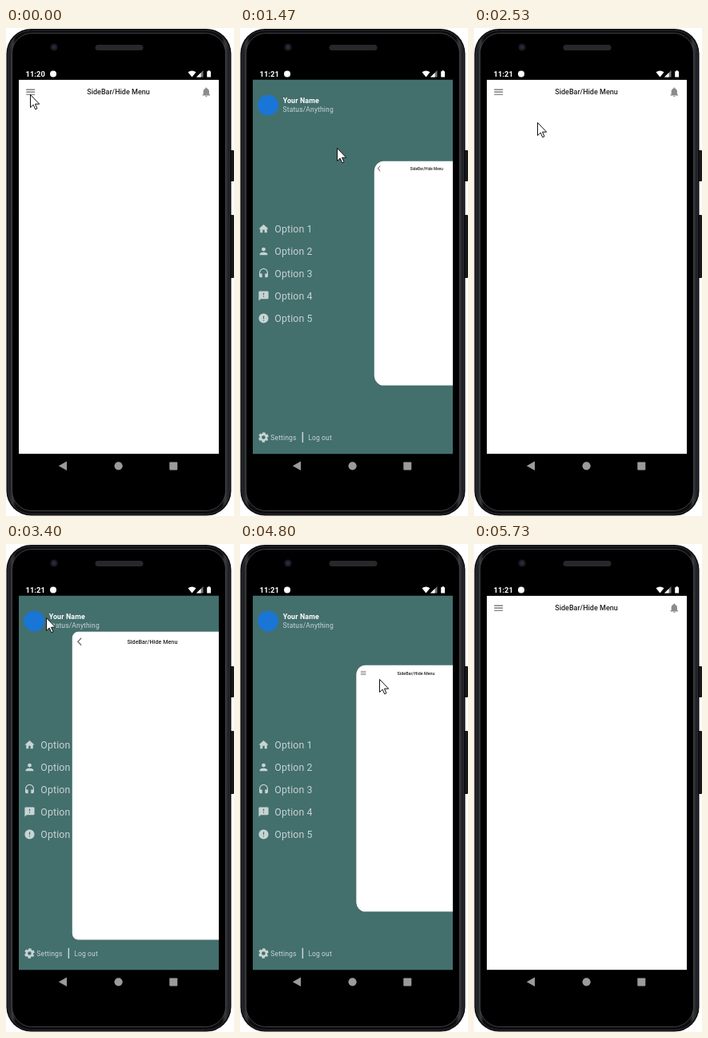
An HTML page for the animation above (6140 ms loop, 285x611 px).

```html
<!DOCTYPE html>
<html lang="en">
<head>
<meta charset="utf-8">
<title>Sidebar menu</title>
<style>
  html, body { margin: 0; width: 100%; height: 100%; overflow: hidden; background: #fff; }
  svg { display: block; width: 100vw; height: 100vh; }
  text { font-family: Roboto, "Open Sans", sans-serif; }
  .drawer { fill: #c7d4d3; }
  .drawer text { font-size: 8.5px; letter-spacing: .15px; }
  .drawer .option { font-size: 12.3px; }
  .drawer .name { font-size: 8.8px; font-weight: 700; fill: #fff; }
  .title { font-size: 9px; font-weight: 500; fill: #222; text-anchor: middle; }
</style>
</head>
<body>
<svg viewBox="0 0 285 611">
  <defs>
    <clipPath id="screen"><rect x="16" y="64.8" width="250" height="468.4"/></clipPath>
    <linearGradient id="rim">
      <stop offset="0" stop-color="#17181a"/>
      <stop offset=".012" stop-color="#26272b"/>
      <stop offset=".02" stop-color="#3a3b40"/>
      <stop offset=".035" stop-color="#0c0c0e"/>
      <stop offset=".965" stop-color="#0c0c0e"/>
      <stop offset=".98" stop-color="#3a3b40"/>
      <stop offset="1" stop-color="#17181a"/>
    </linearGradient>
  </defs>

  <g id="phone">
    <path d="M280 153h4q1 0 1 1v37q0 1-1 1h-4zM280 234h4q1 0 1 1v77q0 1-1 1h-4z" fill="#17181a"/>
    <rect x=".5" y="1" width="281" height="609.5" rx="31" fill="#0b0b0d"/>
    <rect x="2.5" y="3" width="277" height="605.5" rx="29" fill="url(#rim)" stroke="#2c2d31"/>
    <rect x="7.5" y="6.5" width="267" height="598" rx="25" fill="#000" stroke="#45464b" stroke-width=".9"/>
    <circle cx="60" cy="24" r="4.6" fill="#1a1b20"/>
    <circle cx="60" cy="24" r="2.3" fill="#282a44"/>
    <rect x="111.5" y="21" width="60" height="7" rx="3.5" fill="#27282b"/>
    <g fill="#9b9b9b">
      <path d="M65.8 548.3l10.2-5.8v11.6z"/>
      <circle cx="140.6" cy="548.3" r="5.1"/>
      <rect x="204.3" y="543.4" width="10" height="10" rx=".8"/>
    </g>
  </g>

  <g id="status" fill="#fff">
    <text id="clock" x="24.6" y="61" font-size="9.4" font-weight="700"></text>
    <circle cx="59" cy="57.4" r="4"/>
    <path d="M227.5 55.3q5-3.6 10 0l-5 6.2z"/>
    <path d="M246.5 53v8.5H238z" fill="#777"/>
    <path d="M243.6 55.9v5.6H238z"/>
    <path d="M251.2 54.2h1.3v-1h2.3v1h1.3v7.3h-4.9z"/>
  </g>

  <g clip-path="url(#screen)">
    <rect x="16" y="64" width="251" height="470" fill="#436f6d"/>
    <g class="drawer">
      <circle cx="35.1" cy="96.6" r="12.9" fill="#1976d6"/>
      <text class="name" x="53.7" y="94.3">Your Name</text>
      <text x="53.5" y="104.7">Status/Anything</text>
      <g id="options"></g>
      <g transform="translate(29.4 512.5)" fill="none" stroke="#c7d4d3">
        <circle r="3.6" stroke-width="2.6"/>
        <circle r="5.2" stroke-width="2.2" stroke-dasharray="3.2 2.245" stroke-dashoffset="1.6"
          transform="rotate(30)"/>
      </g>
      <text x="38.3" y="515.9">Settings</text>
      <rect x="77.6" y="505.8" width="1.5" height="13.2"/>
      <text x="85.2" y="515.9">Log out</text>
    </g>

    <g id="panel">
      <rect id="sheet" width="251" height="468.2" fill="#fff"/>
      <text class="title" x="124.5" y="18.3">SideBar/Hide Menu</text>
      <path id="menu" fill="#666"/>
      <path id="back" fill="#666"/>
      <path id="bell" fill="#8c8c8c"/>
    </g>
  </g>

  <path id="cursor" d="M.5 .5V16.6L4.2 13.1 6.7 18.8 9 17.8 6.5 12.2H11.7Z"
    fill="#fff" stroke="#111" stroke-width="1"/>
</svg>

<script>
const LOOP = 6140, STEP = 200 / 3, SLIDE = 250;
const OFFSET = { x: 151.8, y: 101.7 };
const toggles = [601, 2070, 3290, 4763];

// [time, x, y] of the pointer tip
const pointer = [
  [1070, 30, 83], [1400, 104, 138], [1670, 174, 186], [1733, 172, 177], [1930, 169, 170],
  [2133, 169, 170], [2330, 129, 149], [2533, 79.5, 118], [2733, 44, 92], [3133, 29, 80.5],
  [3335, 29, 80.5], [3600, 115, 129], [3933, 174, 174], [4000, 181, 176],
  [4133, 181, 176], [4267, 174, 169], [4800, 174, 169],
  [5130, 179, 390], [5400, 170, 602], [5667, 73, 604]
];
const POINTER_GONE = 5730;

const icons = {
  menu: "M3 18h18v-2H3zM3 13h18v-2H3zM3 6v2h18V6z",
  back: "M11.67 3.87L9.9 2.1 0 12l9.9 9.9 1.77-1.77L3.54 12z",
  bell: "M12 22c1.1 0 2-.9 2-2h-4c0 1.1.9 2 2 2zm6-6v-5c0-3.07-1.64-5.64-4.5-6.32V4c0-.83-.67-1.5-1.5-1.5s-1.5.67-1.5 1.5v.68C7.63 5.36 6 7.92 6 11v5l-2 2v1h16v-1z",
  home: "M10 20v-6h4v6h5v-8h3L12 3 2 12h3v8z",
  person: "M12 12a4 4 0 1 0 0-8 4 4 0 0 0 0 8zm0 2c-2.67 0-8 1.34-8 4v2h16v-2c0-2.66-5.33-4-8-4z",
  headset: "M12 1a9 9 0 0 0-9 9v7a3 3 0 0 0 3 3h3v-8H5v-2a7 7 0 0 1 14 0v2h-4v8h3a3 3 0 0 0 3-3v-7a9 9 0 0 0-9-9z",
  feedback: "M20 2H4a2 2 0 0 0-2 2v18l4-4h14a2 2 0 0 0 2-2V4a2 2 0 0 0-2-2zm-7 12h-2v-2h2zm0-4h-2V6h2z",
  error: "M12 2a10 10 0 1 0 0 20 10 10 0 0 0 0-20zm1 15h-2v-2h2zm0-4h-2V7h2z"
};

const $ = id => document.getElementById(id);
const clamp = v => Math.max(0, Math.min(1, v));
const lerp = (a, b, p) => a + (b - a) * p;
const iconAt = (x, y) => `translate(${x} ${y}) scale(.608) translate(-12 -12)`;

for (const [id, x] of [["menu", 14.7], ["back", 14.9], ["bell", 234.3]]) {
  $(id).setAttribute("d", icons[id]);
  $(id).setAttribute("transform", iconAt(x, 15.2));
}

$("options").innerHTML = ["home", "person", "headset", "feedback", "error"].map((name, i) => {
  const y = 251.5 + 28 * i;
  return `<path d="${icons[name]}" transform="${iconAt(29.5, y)}"/>
    <text class="option" x="43.3" y="${y + 4.5}">Option ${i + 1}</text>`;
}).join("");

function pointerAt(t) {
  const next = pointer.findIndex(key => key[0] > t);
  if (next === 0) return pointer[0].slice(1);
  if (next < 0) return pointer.at(-1).slice(1);
  const [t0, x0, y0] = pointer[next - 1], [t1, x1, y1] = pointer[next];
  const p = (t - t0) / (t1 - t0);
  return [Math.round(lerp(x0, x1, p)), Math.round(lerp(y0, y1, p))];
}

function drawerAt(t) {
  const past = toggles.filter(start => start <= t);
  const open = past.length % 2 === 1;
  const p = past.length ? clamp((t - past.at(-1)) / SLIDE) : 1;
  return { open, amount: open ? p : 1 - p };
}

function render(time) {
  const t = Math.floor((time % LOOP + 3.4) / STEP) * STEP;
  const { open, amount } = drawerAt(t);
  const scale = 1 - .4 * amount;
  const turn = Math.cos(.5 * amount);

  $("panel").setAttribute("transform",
    `translate(${16 + OFFSET.x * amount} ${65 + OFFSET.y * amount}) scale(${scale * turn} ${scale})`);
  $("sheet").setAttribute("rx", 22 * amount);
  $("menu").style.display = open ? "none" : "";
  $("back").style.display = open ? "" : "none";
  $("clock").textContent = t < 60 ? "11:20" : "11:21";

  $("cursor").style.display = t < POINTER_GONE ? "" : "none";
  $("cursor").setAttribute("transform", `translate(${pointerAt(t)})`);
}

const start = performance.now();
function tick() {
  render(performance.now() - start);
  requestAnimationFrame(tick);
}
tick();
</script>
</body>
</html>
```
